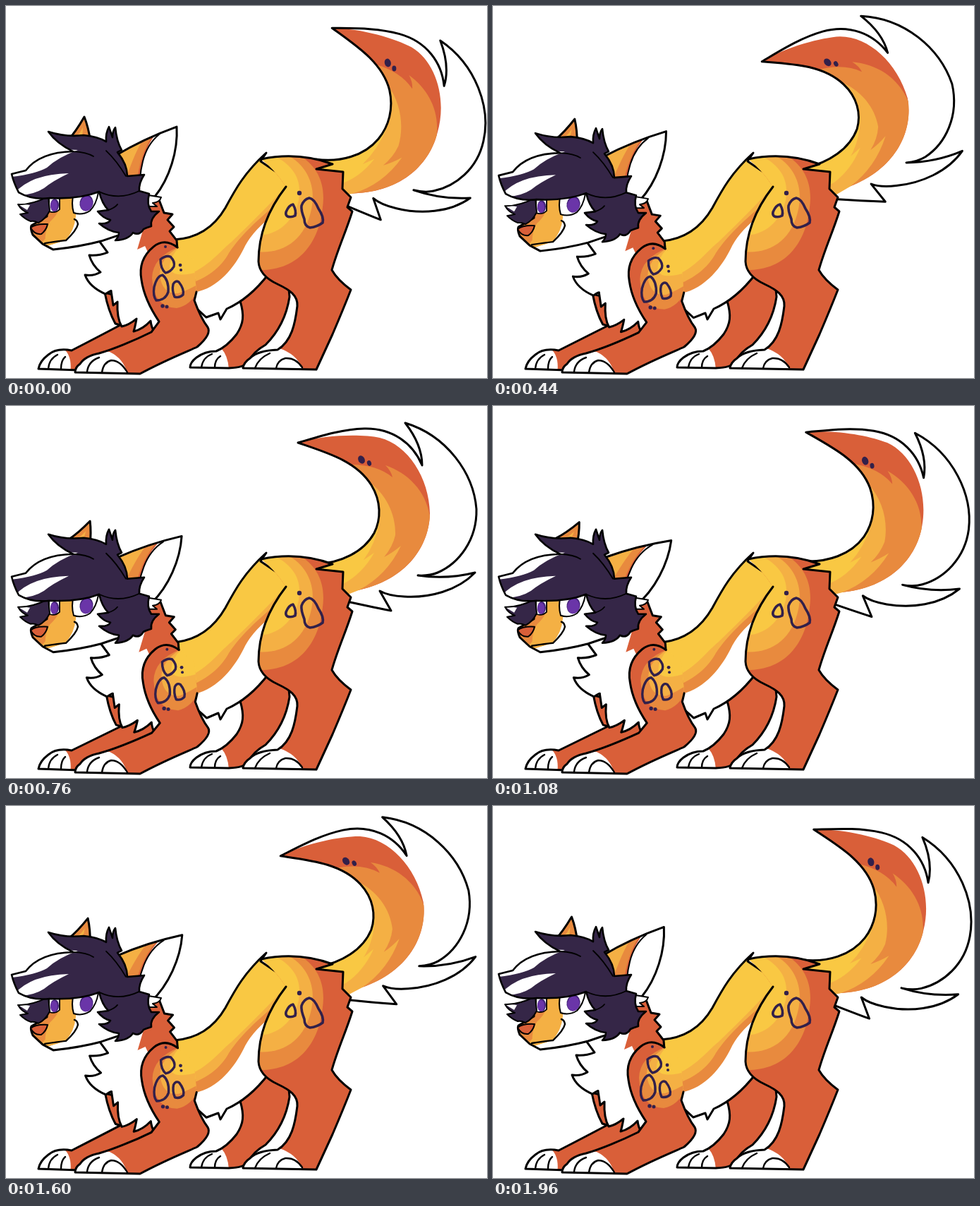
Recreate the animation shown at these times as an HTML page with a canvas. Size 682 px wide and 527 px high, loop 2000 ms.

```html
<!DOCTYPE html>
<html lang="en">
<head>
<meta charset="utf-8">
<title>Tail wag</title>
<style>
html, body { margin: 0; width: 100%; height: 100%; overflow: hidden; background: #fff; }
canvas { display: block; }
</style>
</head>
<body>
<canvas id="stage" width="682" height="527"></canvas>
<script>
const ctx = document.getElementById('stage').getContext('2d');
const RED = '#d95f39', ORANGE = '#e88a3e', LIGHT = '#f4b044', YELLOW = '#f9c843',
      HAIR = '#352647', SPOT = '#32204a', WHITE = '#fff', INK = '#000',
      IRIS = '#6a35a8', IRIS_DARK = '#44237a';
ctx.lineJoin = ctx.lineCap = 'round';

const clamp = v => Math.max(0, Math.min(1, v));

// Linear interpolation through [time, value] pairs.
function track(t, keys) {
  const i = Math.max(1, keys.findIndex(k => k[0] >= t));
  const [t0, v0] = keys[i - 1], [t1, v1] = keys[i];
  return v0 + (v1 - v0) * (t - t0) / (t1 - t0);
}
const WAG = [[0, -.55], [80, -.35], [400, .28], [440, .46], [500, .5], [560, .43],
             [680, .15], [760, 0], [800, -.16], [960, -.47], [1000, -.55]];
const EAR = [[0, 0], [440, .3], [760, .63], [1080, 1], [1400, 1], [1800, .4], [1960, .03], [2000, 0]];
const FAR_EAR = [[0, 0], [1080, 1], [2000, 0]];

// Positive angles turn clockwise.
function turn([x, y], cx, cy, a) {
  const c = Math.cos(a), s = Math.sin(a), dx = x - cx, dy = y - cy;
  return [cx + dx * c - dy * s, cy + dx * s + dy * c];
}

let wag, bob, earTurn, farTurn;
const still = p => p;
const head = ([x, y]) => [x, y + 4 * bob];
const ear = p => head(turn(p, 165, 235, .19 * earTurn));
const farEar = p => head(turn(p, 106, 190, .36 * farTurn));
const front = ([x, y]) => {
  const w = Math.min(clamp((300 - x) / 60), clamp((480 - y) / 60)) * bob;
  return [x + 2.5 * w, y + 4 * w];
};
const tail = p => {
  const bend = clamp((235 - p[1]) / 130);
  return turn(turn(p, 567, 168, -.2 * wag * bend), 470, 218, -.34 * wag);
};

const path = (d, warp) => new Path2D(
  d.replace(/(\d+),(\d+)/g, (_, x, y) => warp([+x, +y]).join()));

function line(warp, d, width = 3, color = INK) {
  ctx.lineWidth = width;
  ctx.strokeStyle = color;
  ctx.stroke(path(d, warp));
}

function fill(warp, d, color) {
  ctx.fillStyle = color;
  ctx.fill(path(d, warp));
}

// An outlined shape with colour patches clipped inside it.
function shape(warp, d, color, patches = [], width = 3) {
  const p = path(d, warp);
  ctx.save();
  ctx.fillStyle = color;
  ctx.fill(p);
  ctx.clip(p);
  for (const [patch, c] of patches) fill(warp, patch, c);
  ctx.restore();
  if (width) {
    ctx.lineWidth = width;
    ctx.strokeStyle = INK;
    ctx.stroke(p);
  }
}

function dot(warp, x, y, rx, ry = rx, tilt = 0, color = SPOT) {
  ctx.fillStyle = color;
  ctx.beginPath();
  ctx.ellipse(...warp([x, y]), rx, ry, tilt, 0, 7);
  ctx.fill();
}

function drawTail() {
  shape(tail, `M440,224 C475,222 507,207 522,180 C532,160 532,135 518,112 C497,78 455,66 414,52
    C445,43 475,33 508,32 C548,31 577,53 590,84 C590,62 580,42 566,24 C625,42 663,95 667,146
    C668,190 642,223 612,236 Q600,241 584,240 Q625,246 665,236 C640,262 600,272 565,270
    Q542,269 530,262 L546,290 Q515,284 470,274 Z`, WHITE, [
    ['M414,52 C455,40 505,40 530,45 C570,55 600,102 601,152 C600,205 560,255 480,264 L400,300 L400,40 Z', RED],
    ['M485,83 Q525,82 548,101 Q546,92 538,84 C570,95 595,120 601,156 C598,205 560,255 480,264 L400,300 L430,180 Z', ORANGE],
    ['M512,105 C540,125 553,155 552,183 Q548,200 536,214 Q548,208 560,198 Q540,240 500,261 L400,300 L430,200 Z', LIGHT],
    ['M530,163 Q524,195 507,218 L522,208 Q505,238 478,252 L400,280 L430,200 Z', YELLOW]]);
  dot(tail, 504, 76, 4.5, 6, -.5 - wag * .5);
  dot(tail, 515, 81, 3, 4, -.3 - wag * .5);
}

function drawFarLegs() {
  shape(still, `M362,380 Q350,402 332,418 C338,438 337,450 327,465 Q313,483 298,489 Q282,489 270,498
    Q261,505 261,512 L316,513 Q338,512 343,505 Q350,490 368,480 Q396,452 402,412 L400,390 Z`, RED, [
    ['M255,480 L306,486 Q315,496 316,516 L255,516 Z', WHITE]]);
  line(still, 'M277,512 Q279,498 292,493 M296,512 Q296,501 304,496', 2.4);

  shape(front, `M140,406 Q145,432 155,450 L162,452 Q130,469 93,488 Q72,484 60,494 Q48,503 46,514
    L105,516 L215,470 L195,420 Z`, RED, [
    ['M40,480 L78,482 Q95,494 91,520 L40,520 Z', WHITE]]);
  line(still, 'M60,514 Q61,500 73,494 M78,514 Q78,502 84,497', 2.4);
}

function drawTorso() {
  shape(front, `M238,331 C275,329 297,310 311,286 C325,260 338,236 369,208 L361,220 L420,260 L372,380
    Q345,415 313,429 L304,444 L301,435 L284,441 Q260,420 245,400 Z`, YELLOW, [
    ['M404,248 C375,280 355,300 320,334 C300,350 285,374 245,385 L240,460 L380,460 Z', LIGHT],
    ['M384,280 C355,305 335,322 316,350 C305,370 285,388 245,398 L240,460 L380,460 Z', ORANGE],
    ['M374,300 Q347,322 337,344 C325,368 302,400 266,406 L250,460 L390,460 Z', WHITE]]);

  // Neck and chest
  shape(front, `M130,330 L144,349 Q132,354 118,353 Q122,367 134,377 Q124,383 112,381 Q118,398 141,408
    Q150,402 149,404 L152,424 L158,419 Q157,442 164,454 Q174,452 185,443 Q183,455 181,461
    Q194,458 205,446 Q206,455 210,461 L218,448 L245,370 L242,332 L232,319 L238,313 L229,303
    L236,295 L224,293 L216,272 L150,280 Z`, WHITE, [
    ['M185,260 L194,318 L186,345 L197,340 L204,355 L220,420 L260,400 L260,270 Z', RED]]);
}

function drawHaunch() {
  const rim = `M397,256 C372,288 358,325 358,362 Q359,382 385,394 C402,402 414,410 413,425
    C410,450 405,475 385,487 Q357,488 346,499 Q337,505 336,513 L440,515 Q447,500 463,465
    Q478,430 489,402 Q470,388 462,374 C470,345 482,320 491,291 L484,285 L489,271 L477,259
    L478,235 L440,231 L463,224 C430,212 395,210 362,217`;
  shape(still, rim + ' Q380,230 397,256 Z', RED, [
    ['M400,205 C440,218 454,250 449,285 C444,335 415,377 354,374 L340,210 Z', ORANGE],
    ['M385,205 C428,220 440,255 433,288 C424,330 395,352 354,348 L340,210 Z', LIGHT],
    ['M365,205 C408,222 420,245 415,275 C408,305 385,326 354,325 L340,210 Z', YELLOW],
    ['M330,480 L385,484 Q416,494 421,518 L330,518 Z', WHITE]], 0);
  line(still, rim);
  line(still, 'M353,513 Q358,499 374,492 M383,513 Q385,502 396,499 Q411,498 420,512', 2.4);
  line(still, `M397,292 Q401,282 407,281 Q412,290 410,297 Q404,300 399,298 Q396,296 397,292 Z
    M419,283 Q422,274 430,272 Q437,273 443,287 Q451,299 449,307 Q441,313 431,314 Q423,312 423,302 Q418,289 419,283 Z`, 3.6, SPOT);
  dot(still, 416, 265, 3.2);
}

function drawShoulder() {
  const rim = `M243,342 Q225,328 209,341 C192,355 189,372 192,388 Q196,416 217,447 L206,462
    C182,474 150,487 132,492 Q112,496 105,507 Q98,512 98,519 L190,521 C225,502 258,489 271,483
    Q292,465 286,455 Q276,442 267,417 L270,405`;
  shape(front, rim + ' L266,360 Z', YELLOW, [
    ['M246,341 L180,320 L90,530 L310,530 L310,460 L272,404 L250,400 Z', RED],
    ['M246,341 Q208,355 207,385 Q209,427 242,428 Q262,424 272,403 L272,390 L250,370 Z', ORANGE],
    ['M246,341 Q217,358 218,382 Q222,409 244,407 Q260,402 278,391 L272,378 L250,360 Z', LIGHT],
    ['M246,341 Q231,357 232,373 Q240,387 278,375 L275,335 Z', YELLOW],
    ['M95,485 L147,490 Q168,500 173,524 L95,524 Z', WHITE]], 0);
  line(front, rim);
  line(still, 'M115,518 Q117,503 132,498 M136,519 Q138,505 149,502 Q162,502 172,519', 2.4);
  line(front, `M219,359 Q226,353 233,355 Q240,362 238,369 Q233,377 226,378 Q219,372 219,359 Z
    M210,398 Q214,382 222,381 Q231,388 230,405 Q226,417 213,417 Q208,411 210,398 Z
    M237,394 Q240,388 245,391 Q253,401 251,409 Q246,414 239,412 Q235,403 237,394 Z`, 3.4, SPOT);
  for (const [x, y, r] of [[226, 341, 2], [247, 367, 2.4], [248, 374, 2], [222, 425, 2.7], [228, 426, 2.5]])
    dot(front, x, y, r);
}

function drawEars() {
  shape(farEar, 'M88,190 Q99,178 111,157 Q117,172 120,193 Z', ORANGE, [
    ['M88,195 Q101,188 109,172 Q109,185 105,195 Z', LIGHT]]);
  shape(ear, 'M155,212 Q195,188 242,171 C244,205 232,244 211,270 L180,270 Q172,240 155,212 Z', WHITE, [
    ['M150,208 L217,176 Q200,194 194,220 Q190,240 190,262 L160,262 Z', RED],
    ['M150,208 L212,179 Q194,200 187,239 L160,262 Z', ORANGE],
    ['M150,208 L194,190 Q184,205 172,239 L150,240 Z', LIGHT]]);
  line(ear, 'M217,182 Q200,196 194,220 Q191,232 190,244', 2);
}

function drawFace() {
  shape(head, 'M202,268 L220,271 Q218,278 208,279 L214,284 L200,284 Z', WHITE, [], 2);
  shape(head, `M58,262 L58,298 L36,311 Q34,315 38,324 L52,337 L67,345 Q105,341 135,333
    Q155,326 175,320 L160,250 Z`, WHITE, [
    ['M75,262 L76,290 L34,308 L30,320 L58,340 L84,332 Q97,318 99,298 L99,262 Z', LIGHT],
    ['M72,285 L34,306 L30,320 L52,334 Q70,312 85,305 Q95,288 89,270 Z', ORANGE],
    ['M76,268 Q82,288 62,306 Q52,325 58,340 L84,332 Q101,312 96,294 L101,262 Z', LIGHT]]);
  shape(head, 'M35,314 Q42,308 59,309 Q57,318 50,323 Q40,324 35,314 Z', RED, [], 2);
  line(head, 'M55,336 Q75,333 85,332 Q100,318 102,309 Q101,303 97,302', 2.4);

  // Eyes
  shape(head, 'M61,270 L61,291 Q70,294 76,288 L76,268 Z', WHITE, [], 1.8);
  dot(head, 69, 282, 6, 9, 0, IRIS_DARK);
  dot(head, 68, 283, 5, 8, 0, IRIS);
  shape(head, 'M96,265 Q92,280 96,293 Q108,297 119,290 Q128,281 131,264 Z', WHITE, [], 2);
  dot(head, 114, 279, 9.5, 11.5, .2, IRIS_DARK);
  dot(head, 114, 280, 8.5, 10.5, .2, IRIS);
}

function drawHair() {
  shape(head, `M17,281 Q35,282 60,270 L62,290 Q56,302 46,307 Q40,304 35,305 Q27,302 20,295
    L31,293 Q22,290 17,281 Z`, HAIR, [['M14,279 L34,282 L30,289 Z', WHITE]], 2);
  shape(head, `M8,238 L28,233 Q48,207 95,206 Q72,195 60,178 Q85,186 110,183 Q130,185 142,192 Q141,180 146,171
    L151,186 Q151,177 155,172 Q157,192 164,204 L158,207 Q172,224 172,241 L196,239 Q188,251 189,262
    L203,266 Q199,281 206,291 L217,291 Q204,301 206,312 Q199,314 195,316 Q189,326 180,321
    Q174,331 155,332 Q160,327 160,321 Q146,320 132,308 Q145,309 148,303 Q138,301 130,291
    L145,289 Q136,280 132,263 Q104,274 62,272 Q37,275 18,264 Q11,251 8,238 Z`, HAIR, [
    ['M5,239 L28,228 Q48,200 102,204 Q74,214 58,229 Q42,238 8,242 Z', WHITE],
    ['M12,265 Q36,238 89,237 Q66,248 54,258 Q40,267 20,268 Z', WHITE]], 2.6);
  line(head, `M95,206 Q115,207 124,213 M142,205 Q157,219 170,241 M132,263 Q160,276 189,262
    M145,289 Q154,286 158,281`, 1.8);
}

function frame(now) {
  const t = Math.floor(now % 2000 / 40) * 40;
  wag = track(t % 1000, WAG);
  bob = (1 + Math.cos((t - 920) / 1000 * Math.PI)) / 2;
  earTurn = track(t, EAR);
  farTurn = track(t, FAR_EAR);

  ctx.fillStyle = WHITE;
  ctx.fillRect(0, 0, 682, 527);
  drawTail();
  drawFarLegs();
  drawTorso();
  drawHaunch();
  drawShoulder();
  drawEars();
  drawFace();
  drawHair();
}

const start = performance.now();
(function loop() {
  frame(performance.now() - start);
  requestAnimationFrame(loop);
})();
</script>
</body>
</html>
```
